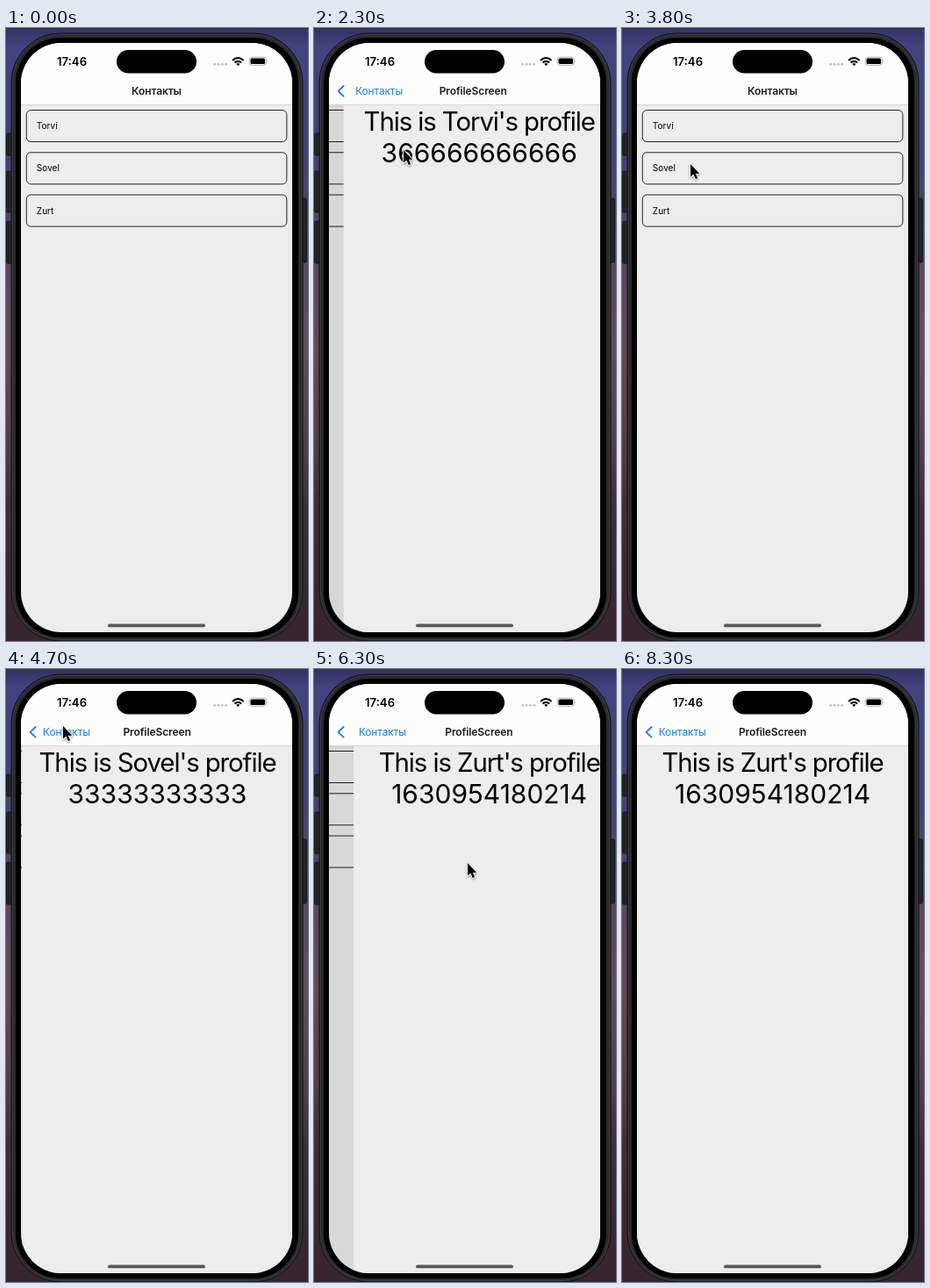
These frames come from a looping animation (344 px wide and 698 px high, 8.4 s). An HTML page:

```html
<!DOCTYPE html>
<html lang="ru">
<head>
<meta charset="utf-8">
<title>Контакты</title>
<style>
  html, body { margin: 0; width: 100%; height: 100%; overflow: hidden; background: #35222e; }
  svg { display: block; width: 344px; height: 698px; font-family: Inter, Roboto, sans-serif; }
  .mid { text-anchor: middle; }
  .title { font-size: 12px; font-weight: 600; letter-spacing: -.1px; fill: #1c1c1e; }
  .big { font-size: 29.4px; letter-spacing: -1.1px; text-anchor: middle; }
  .digits { font-size: 30px; letter-spacing: 0; }
  .row rect { fill: none; stroke: #222; }
  .row text { font-size: 10.1px; }
  #backLabel { font-size: 11.9px; letter-spacing: -.1px; fill: #147cf2; }
  #cursor { stroke: #fff; stroke-width: 1.8; stroke-linejoin: round; paint-order: stroke; filter: drop-shadow(0 1px 1px #0006); }
</style>
</head>
<body>
<svg viewBox="0 0 344 698">
  <defs>
    <linearGradient id="sky" x2="0" y2="1">
      <stop stop-color="#34315f"/>
      <stop offset=".03" stop-color="#444180"/>
      <stop offset=".22" stop-color="#454076"/>
      <stop offset=".37" stop-color="#5a4763"/>
      <stop offset=".53" stop-color="#664a56"/>
      <stop offset=".7" stop-color="#523a45"/>
      <stop offset=".78" stop-color="#412c36"/>
      <stop offset="1" stop-color="#38242e"/>
    </linearGradient>
    <clipPath id="screen"><rect x="17" y="17" width="309" height="671" rx="46"/></clipPath>
  </defs>

  <rect width="344" height="698" fill="url(#sky)"/>
  <g fill="#232427" stroke="#131315" stroke-width=".8">
    <rect x=".5" y="120" width="8" height="25" rx="1.5"/>
    <rect x=".5" y="163" width="8" height="47" rx="1.5"/>
    <rect x=".5" y="220" width="8" height="48" rx="1.5"/>
    <rect x="335" y="194" width="7.5" height="73" rx="1.5"/>
  </g>
  <rect x="6" y="6" width="332" height="692" rx="56" fill="#2a2b2d" stroke="#131315"/>
  <rect x="7.5" y="7.5" width="329" height="689" rx="54.5" fill="none" stroke="#414345" stroke-width=".8"/>
  <rect x="11" y="11" width="322" height="683" rx="51"/>

  <g clip-path="url(#screen)">
    <rect x="17" y="17" width="309" height="671" fill="#ededed"/>
    <g id="list"></g>
    <rect id="dim" x="17" y="87" width="309" height="601"/>
    <g id="profile">
      <rect x="17" y="87" width="309" height="601" fill="#ededed"/>
      <text id="about" class="big" x="171.5" y="116.5"></text>
      <text id="phone" class="big digits" x="171.5" y="152.8"></text>
    </g>
    <rect x="17" y="17" width="309" height="70" fill="#fdfdfd"/>
    <rect x="17" y="87" width="309" height=".7" fill="#cfcfcf"/>
    <text id="listTitle" class="title mid" x="171.5" y="76">Контакты</text>
    <text id="profileTitle" class="title mid" x="171.5" y="76">ProfileScreen</text>
    <g id="back">
      <path d="M33.6 66L27.6 71.8L33.6 77.6" fill="none" stroke="#147cf2" stroke-width="1.8" stroke-linecap="round" stroke-linejoin="round"/>
      <text id="backLabel" x="41.7" y="76">Контакты</text>
    </g>

    <text class="mid" x="75" y="42.8" font-size="13.2" font-weight="600">17:46</text>
    <rect x="126" y="25" width="91" height="26.5" rx="13.25"/>
    <g fill="#c6c6c8">
      <circle cx="237.6" cy="41.3" r="1.5"/><circle cx="242" cy="41.3" r="1.5"/>
      <circle cx="246.3" cy="41.3" r="1.5"/><circle cx="250.7" cy="41.3" r="1.5"/>
    </g>
    <g fill="none" stroke="#000" stroke-width="2.1">
      <path d="M258 37.1Q264.3 30.9 270.6 37.1M260.5 39.6Q264.3 36 268.1 39.6"/>
      <path d="M262.3 40.9Q264.3 39.2 266.3 40.9L264.3 43Z" fill="#000" stroke="none"/>
    </g>
    <rect x="277.2" y="33.2" width="19.2" height="9.2" rx="2.8" fill="none" stroke="#a3a3a3" stroke-width=".8"/>
    <rect x="278.5" y="34.5" width="16.6" height="6.6" rx="1.7"/>
    <path d="M297.6 36.4Q299.2 37.8 297.6 39.3Z" fill="#a3a3a3"/>
    <rect x="116" y="678.5" width="111" height="3.8" rx="1.9" fill="#595959"/>
  </g>

  <path id="cursor" d="M0 0V14.6L3.4 11.5L5.8 17L8.2 16L5.9 10.7H10.4Z"/>
</svg>
<script>
const LOOP = 8400, STEP = 100, WIDTH = 309, SPRING = 0.015;
const contacts = [
  { name: 'Torvi', phone: '366666666666' },
  { name: 'Sovel', phone: '33333333333' },
  { name: 'Zurt', phone: '1630954180214' }
];
// Navigation: time, whether the profile opens, contact index
const visits = [
  [1990, true, 0], [2800, false, 0],
  [4170, true, 1], [4900, false, 1],
  [6033, true, 2]
];
// Pointer: time, x, y
const pointerPath = [
  [400, 130, 702], [1200, 106, 175], [1700, 101, 149], [1950, 102, 124], [2100, 102, 126],
  [2300, 102, 139], [2650, 65, 69], [2900, 65, 69], [3600, 78, 155], [4200, 78, 155],
  [4650, 65, 65], [4950, 65, 65], [5800, 174, 216], [6300, 175, 221],
  [6700, 176, 217], [6800, 178, 203], [7500, 212, 148], [7800, 212, 148], [8250, 205, -20]
];

const $ = id => document.getElementById(id);
const shift = (id, x, y = 0) => $(id).setAttribute('transform', `translate(${x} ${y})`);
const fade = (id, opacity) => $(id).setAttribute('opacity', opacity);

$('list').innerHTML = contacts.map(({ name }, i) => `
  <g class="row" transform="translate(0 ${i * 48.25})">
    <rect x="23.3" y="93.5" width="296.5" height="36" rx="5"/>
    <text x="34.8" y="115.1">${name}</text>
  </g>`).join('');

function navigation(time) {
  const visit = visits.filter(v => v[0] <= time).pop();
  if (!visit) return { open: 0, contact: contacts[0] };
  const [start, opening, index] = visit;
  const phase = (time - start) * SPRING;
  const rest = (1 + phase) * Math.exp(-phase);
  return { open: opening ? 1 - rest : rest, contact: contacts[index] };
}

function pointer(time) {
  const next = pointerPath.findIndex(p => p[0] > time);
  if (next < 1) return [0, -50];
  const [t0, x0, y0] = pointerPath[next - 1], [t1, x1, y1] = pointerPath[next];
  const k = (time - t0) / (t1 - t0), ease = k * k * (3 - 2 * k);
  return [x0 + (x1 - x0) * ease, y0 + (y1 - y0) * ease];
}

function draw(time) {
  const { open, contact } = navigation(time), closed = 1 - open;
  $('about').textContent = `This is ${contact.name}'s profile`;
  $('phone').textContent = contact.phone;
  shift('profile', WIDTH * closed);
  shift('list', -0.3 * WIDTH * open);
  fade('dim', 0.1 * open);
  shift('listTitle', -102 * open);
  fade('listTitle', Math.max(0, 1 - open * 1.6));
  shift('profileTitle', 180 * closed);
  fade('profileTitle', Math.min(1, open * 1.1));
  shift('backLabel', 101 * closed);
  fade('back', Math.min(1, open * 1.1));
  shift('cursor', ...pointer(time));
}

function frame(now) {
  draw(Math.floor(now % LOOP / STEP) * STEP);
  requestAnimationFrame(frame);
}
draw(0);
requestAnimationFrame(frame);
</script>
</body>
</html>
```
